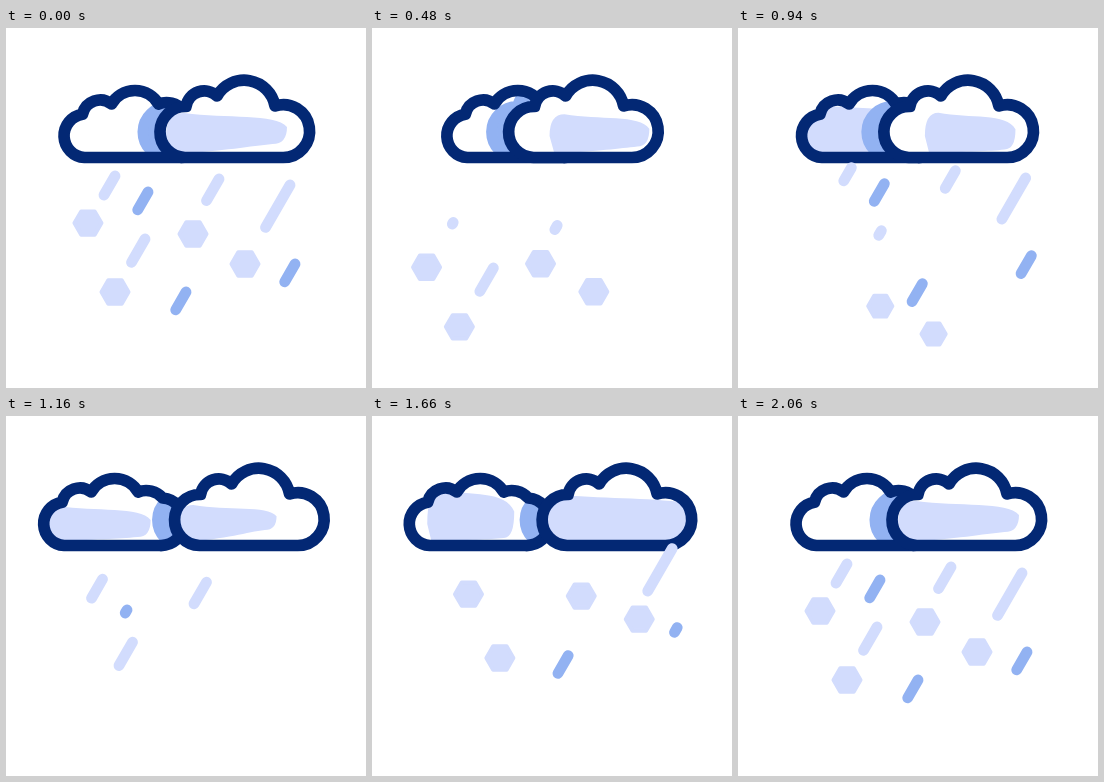
Recreate the animation shown at these times as an HTML page with a canvas. Size 360 by 360 pixels, loop 2.4 s.

```html
<!DOCTYPE html>
<html lang="en">
<head>
<meta charset="utf-8">
<title>Sleet</title>
<style>
html, body { margin: 0; width: 100%; height: 100%; overflow: hidden; background: #fff; }
canvas { display: block; width: 360px; height: 360px; }
</style>
</head>
<body>
<canvas id="stage"></canvas>
<script>
const LOOP = 2400, END = 2060, SWING = 690;
const NAVY = '#032874', BLUE = '#92b2f2', PALE = '#d2dcfd', WHITE = '#fff';

const canvas = document.getElementById('stage');
const ctx = canvas.getContext('2d');
const dpr = window.devicePixelRatio || 1;
canvas.width = canvas.height = 360 * dpr;

const clamp = v => Math.max(0, Math.min(1, v));
const mix = (a, b, k) => a + (b - a) * k;
const ease = k => (1 - Math.cos(Math.PI * clamp(k))) / 2;

const backCloud = new Path2D('M78.5 129.5A21.8 21.8 0 0 1 76.5 86.2A18 18 0 0 1 105.5 76' +
  'A27.2 27.2 0 0 1 152.5 76A22 22 0 0 1 177 82A23.8 23.8 0 0 1 174 129.5Z');
const frontCloud = new Path2D('M179 129.5A25.5 25.5 0 0 1 180 78.5A18.5 18.5 0 0 1 211 68' +
  'A31.3 31.3 0 0 1 269 78A26.4 26.4 0 1 1 277 129.5Z');

// Tinted band inside a cloud at a few times: left, right, top, base of the right end
const tintTimes = [0, 300, 700, 1160, 1440, 1660, END];
const frontRest = [160, 281, 85, 116], hidden = [185, 185, 105, 105];
const frontTint = [frontRest, [163, 276, 91, 110], [238, 320, 80, 130], [158, 256, 89, 114],
  [168, 294, 86, 120], [145, 345, 79, 140], frontRest];
const backTint = [hidden, hidden, [20, 230, 60, 140], [56, 165, 90, 121],
  [84, 205, 90, 125], [76, 163, 74, 122], hidden];

// Top end, length, colour, first time of leaving, last time of arriving
const drops = [
  [109, 148, 22, PALE, 400, 1740],
  [142, 164, 20.6, BLUE, 323, 1720],
  [213, 151, 25, PALE, 400, 1720],
  [284, 157, 49, PALE, 165, 1450],
  [139, 211, 27, PALE, 705, 1780],
  [180, 264, 20.6, BLUE, 300, 1575],
  [289, 236, 20.6, BLUE, 300, 1639]
];
// Each shower: speed, time at the resting place, slant, sideways offset
const showers = [[0.0975, 184, 0.61, 0], [0.1065, 1019, 0.72, -1.6], [0.0985, 1909, 0.665, 0]];

// Resting place, time it moves off, time it vanishes, time it comes to rest
const flakes = [
  [82, 195, 0, 560, 1823],
  [187, 206, 157, 930, 1910],
  [109, 264, 102, 560, 1872],
  [239, 236, 180, 930, 1977]
];

function swing(t, inner, outer) {
  if (t < SWING) return mix(0, inner, ease(t / SWING));
  if (t < 2 * SWING) return mix(inner, outer, ease(t / SWING - 1));
  return mix(outer, 0, ease((t - 2 * SWING) / (END - 2 * SWING)));
}

function tint(keys, t) {
  let i = 0;
  while (i < keys.length - 2 && t >= tintTimes[i + 1]) i++;
  const k = ease((t - tintTimes[i]) / (tintTimes[i + 1] - tintTimes[i]));
  const [left, right, top, base] = keys[i].map((v, j) => mix(v, keys[i + 1][j], k));
  const w = right - left, tip = mix(top, base, 0.45);
  ctx.beginPath();
  ctx.moveTo(left, 108);
  ctx.quadraticCurveTo(left, top, left + w * 0.15, top);
  ctx.bezierCurveTo(left + w * 0.5, top + 6, right - w * 0.1, top, right, tip);
  ctx.quadraticCurveTo(right, base, right - w * 0.12, base);
  ctx.bezierCurveTo(left + w * 0.7, base + 2, left + w * 0.5, 123, left + w * 0.05, 126);
  ctx.closePath();
  ctx.fillStyle = PALE;
  ctx.fill();
}

function cloud(path, keys, x, t, shade) {
  ctx.save();
  ctx.translate(x, 0);
  ctx.fillStyle = WHITE;
  ctx.fill(path);
  ctx.save();
  ctx.clip(path);
  tint(keys, t);
  if (shade) shade();
  ctx.restore();
  ctx.strokeStyle = NAVY;
  ctx.lineWidth = 11.7;
  ctx.stroke(path);
  ctx.restore();
}

function shadow(x) {
  ctx.translate(x - 17, 0);
  ctx.fillStyle = ctx.strokeStyle = BLUE;
  ctx.lineWidth = 11;
  ctx.fill(frontCloud);
  ctx.stroke(frontCloud);
}

function drop([x, y, len, color, out, start], t) {
  const trim = len * 4;
  const lives = [[-LOOP, out], [start - 860, Math.min(out + 770, 1300)], [start, LOOP]];
  lives.forEach(([birth, death], i) => {
    const a = len * clamp((t - death) / trim), b = len * clamp((t - birth) / trim);
    if (b <= a) return;
    const [speed, pause, slant, side] = showers[i];
    let dy = speed * (t - pause);
    if (i === 0) dy = Math.max(0, dy);
    if (i === 2) dy = Math.min(0, dy);
    const px = x + side - dy * slant, py = y + dy;
    ctx.strokeStyle = color;
    ctx.lineWidth = 10.8;
    ctx.beginPath();
    ctx.moveTo(px - a * 0.5, py + a * 0.866);
    ctx.lineTo(px - b * 0.5, py + b * 0.866);
    ctx.stroke();
  });
}

function flake([x, y, go, vanish, stop], t) {
  const leaving = t < 1200;
  const size = leaving ? 1 - clamp((t - vanish) / 120) : clamp((t - stop + 525) / 55);
  if (!size) return;
  const dy = leaving ? 0.092 * Math.max(0, t - go) : 0.104 * Math.min(0, t - stop);
  const dx = -dy * (leaving ? 0.62 : 0.86);
  ctx.save();
  ctx.translate(x + dx, y + dy);
  ctx.scale(size, size);
  ctx.beginPath();
  for (let i = 0; i < 6; i++) {
    ctx.lineTo(13.5 * Math.cos(i * Math.PI / 3), 13.5 * Math.sin(i * Math.PI / 3));
  }
  ctx.closePath();
  ctx.fillStyle = ctx.strokeStyle = PALE;
  ctx.lineWidth = 4;
  ctx.fill();
  ctx.stroke();
  ctx.restore();
}

function draw(now) {
  const t = Math.min(now % LOOP, END);
  ctx.setTransform(dpr, 0, 0, dpr, 0, 0);
  ctx.fillStyle = WHITE;
  ctx.fillRect(0, 0, 360, 360);
  ctx.lineJoin = ctx.lineCap = 'round';
  const back = swing(t, 21.3, -32.7), front = swing(t, -22, 25.4);
  cloud(backCloud, backTint, back, t, () => shadow(front - back));
  cloud(frontCloud, frontTint, front, t);
  flakes.forEach(f => flake(f, t));
  drops.forEach(d => drop(d, t));
}

const begin = performance.now();
function tick() {
  draw(performance.now() - begin);
  requestAnimationFrame(tick);
}
tick();
</script>
</body>
</html>
```
